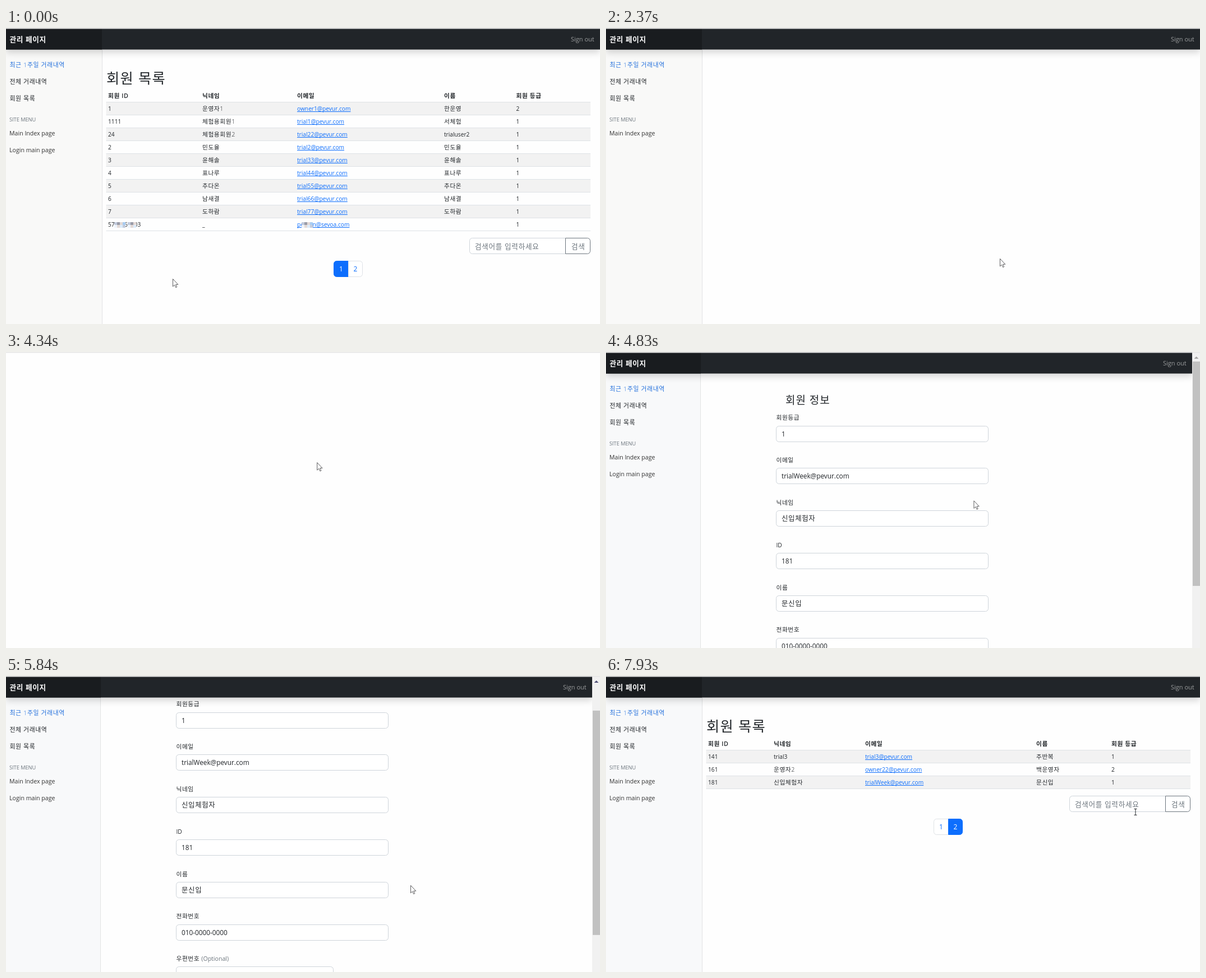
An HTML page with a canvas that plays this animation: 1059 px wide and 529 px high, repeating every 8 s.

```html
<!DOCTYPE html>
<html lang="ko">
<head>
<meta charset="utf-8">
<title>관리 페이지</title>
<style>
  html, body { margin: 0; width: 100%; height: 100%; overflow: hidden; background: #fff; }
  canvas { display: block; }
</style>
</head>
<body>
<canvas id="stage" width="1059" height="529"></canvas>
<script>
const c = document.getElementById('stage').getContext('2d');
const W = 1059, H = 529, LOOP = 8000;
const INK = '#212529', BLUE = '#0d6efd', DEEP = '#0a58ca', GREY = '#6c757d', LINE = '#dee2e6', EDGE = '#ced4da';

const mail = (user) => user + '@pevur.com';
const PAGE1 = [
  ['1', '운영자1', mail('owner1'), '한운영', '2'],
  ['1111', '체험용회원1', mail('trial1'), '서체험', '1'],
  ['24', '체험용회원2', mail('trial22'), 'trialuser2', '1'],
  ['2', '민도율', mail('trial2'), '민도율', '1'],
  ['3', '윤해솔', mail('trial33'), '윤해솔', '1'],
  ['4', '표나루', mail('trial44'), '표나루', '1'],
  ['5', '추다온', mail('trial55'), '추다온', '1'],
  ['6', '남새결', mail('trial66'), '남새결', '1'],
  ['7', '도하람', mail('trial77'), '도하람', '1'],
  ['5710462803', '_', 'podhin@sevoa.com', '', '1']
];
const PAGE2 = [
  ['141', 'trial3', mail('trial3'), '주반복', '1'],
  ['161', '운영자2', mail('owner22'), '백운영자', '2'],
  ['181', '신입체험자', mail('trialWeek'), '문신입', '1']
];
const COLS1 = [182, 350, 519, 781, 909.5];
const COLS2 = [182, 299, 462, 767, 901];
const COLS2_HOVER = [182, 296.5, 457, 772, 904];
const HEADS = ['회원 ID', '닉네임', '이메일', '이름', '회원 등급'];

// label, label centre, width, value, optional
const FIELDS = [
  ['회원등급', 117.5, 379, '1'],
  ['이메일', 193.3, 379, mail('trialWeek')],
  ['닉네임', 269.1, 379, '신입체험자'],
  ['ID', 344.9, 379, '181'],
  ['이름', 420.7, 379, '문신입'],
  ['전화번호', 496.5, 379, '010-0000-0000'],
  ['우편번호', 572.3, 281, '00000', true],
  ['주소', 648.1, 574, '가온 별무구 솔내로 5', true],
  ['상세주소', 727.8, 281, '42', true]
];

// pointer: time, x, y
const PATH = [
  [0, 297, 448], [180, 297, 448], [430, 410, 494], [680, 545, 509], [930, 636, 478],
  [1000, 636, 478], [1300, 597, 460], [1580, 629, 437], [1770, 629, 437], [1840, 630, 438],
  [1960, 630, 438], [2120, 658, 475], [2370, 702, 412], [2780, 706, 354], [2850, 704, 352],
  [3340, 540, 183], [3600, 540, 183], [3680, 540, 187], [3930, 540, 187], [4070, 542, 184],
  [4200, 542, 184], [4340, 554, 197], [4950, 680, 282], [5560, 743, 333], [5700, 738, 342],
  [6290, 667, 475], [7200, 667, 475], [7930, 944, 243], [LOOP, 944, 243]
];

const ARROW = new Path2D('M.5 .5V14L3.6 11.2L5.7 15.8L7.7 14.9L5.7 10.4H9.8Z');
const HAND = new Path2D('M-1.5 1.5Q0 -.5 1.5 1.5V7Q3 5.6 4 7.2Q5.6 6.2 6.3 8Q8 7.4 8 9.5V13' +
  'Q8 15 6.5 17.5H-.5Q-1.5 15.5 -4.6 11.5Q-5.5 9.3 -3.4 9.8L-1.5 11.5Z');

function pointerAt(t) {
  const i = Math.max(1, PATH.findIndex(p => p[0] > t));
  const [a, b] = [PATH[i - 1], PATH[i]];
  const k = (t - a[0]) / (b[0] - a[0]);
  return { x: a[1] + (b[1] - a[1]) * k, y: a[2] + (b[2] - a[2]) * k };
}

const inside = (p, x, y, w, h) => p.x >= x && p.x <= x + w && p.y >= y && p.y <= y + h;

function rect(x, y, w, h, color) {
  c.fillStyle = color;
  c.fillRect(x, y, w, h);
}

function box(x, y, w, h, radii, fill, stroke) {
  c.beginPath();
  c.roundRect(x, y, w, h, radii);
  c.fillStyle = fill;
  c.fill();
  c.strokeStyle = stroke;
  c.lineWidth = 1;
  c.stroke();
}

// y is the vertical centre of the line; returns the text width
function text(s, x, y, size, color = INK, weight = 400, underline = false) {
  const hangul = /[가-힣]/.test(s);
  const px = hangul ? size * 1.05 : size;
  if (hangul && weight === 400) weight = 350;
  c.font = `${weight} ${px}px "Open Sans", "Noto Sans CJK KR", "Noto Sans CJK", sans-serif`;
  c.letterSpacing = hangul ? px * .055 + 'px' : '0px';
  c.fillStyle = color;
  c.fillText(s, x, y + px * .36);
  const w = c.measureText(s).width;
  if (underline) c.fillRect(x, Math.round(y + px * .36 + 1), w, 1);
  return w;
}

function sidebar(edge, t, partial) {
  rect(0, 38, edge, H - 38, t < 4210 ? '#f9f9f8' : '#f8f9fa');
  rect(edge, 38, 1, H - 38, '#e2e3e4');
  text('최근 1주일 거래내역', 6.5, 66, 10.35, '#2470dc');
  text('전체 거래내역', 6.5, 96, 10.35);
  text('회원 목록', 6.5, 126, 10.35);
  text('SITE MENU', 6, 164, 9.2, GREY);
  text('Main Index page', 6, 188.5, 10.6, '#333');
  if (!partial) text('Login main page', 6, 218.5, 10.6, '#333');
}

function topbar(edge, right) {
  c.save();
  c.shadowColor = 'rgba(0,0,0,.15)';
  c.shadowBlur = 12;
  c.shadowOffsetY = 6;
  rect(0, 1, right, 37.5, INK);
  c.restore();
  rect(0, 1, edge, 37.5, '#191c1f');
  text('관리 페이지', 6.5, 20, 12, '#fff', 600);
  text('Sign out', right - 52, 20.5, 11, '#9b9d9e');
}

function mosaic(x, y, cols) {
  const tones = ['#c3cbdc', '#a9cdf2', '#dcebfa', '#e3d9d6', '#9a9ca8', '#eef4fc'];
  for (let i = 0; i < cols * 2; i++)
    rect(x + (i >> 1) * 5, y + (i % 2) * 5, 5, 5, tones[(i * 5 + (i >> 2)) % 6]);
}

function pager(y, active, hover, focus) {
  for (const n of [1, 2]) {
    const on = n === active, lit = n === 2 && (hover || focus);
    const x = n === 1 ? 584.5 : 610.5, w = n === 1 ? 26 : 25;
    const radii = n === 1 ? [5, 0, 0, 5] : [0, 5, 5, 0];
    if (n === 2 && focus) {
      c.beginPath();
      c.roundRect(x - 1.5, y - 1.5, w + 3, 31, radii);
      c.strokeStyle = '#c2dbfe';
      c.lineWidth = 3;
      c.stroke();
    }
    box(x, y, w, 28, radii, on ? BLUE : lit ? '#e9ecef' : '#fff', on ? BLUE : LINE);
    text(String(n), x + w / 2 - 3.4, y + 14.5, 12, on ? '#fff' : lit ? DEEP : BLUE);
  }
}

function list(rows, cols, active, state) {
  text('회원 목록', 179, 90, 24, INK, 300);
  HEADS.forEach((s, i) => text(s, cols[i], 121.5, 10.2, INK, 600));
  rect(178.5, 132, 863.5, 1, LINE);
  rows.forEach((row, r) => {
    const y = 144.5 + r * 23;
    if (r % 2 === 0) rect(178.5, y - 11.5, 863.5, 22, '#f2f2f2');
    rect(178.5, y + 10.5, 863.5, 1, LINE);
    row.forEach((s, i) => {
      const hot = state.link && r === 2;
      if (i === 2) text(s, cols[i], y, 10.2, hot ? DEEP : BLUE, hot ? 600 : 400, true);
      else text(s, cols[i], y, 10.2);
    });
  });
  if (active === 1) {
    mosaic(193, 347, 4);
    mosaic(217, 347, 3);
    mosaic(527, 347, 4);
  }
  const y = 145.5 + rows.length * 23 - (active === 1 ? .5 : 0);
  const top = Math.floor(y) + .5;
  box(826.5, top, 171, 28, [5, 0, 0, 5], '#fff', EDGE);
  text('검색어를 입력하세요', 836, top + 14.5, 12, GREY);
  box(997.5, top, 44, 28, [0, 5, 5, 0], '#fff', GREY);
  text('검색', 1008, top + 14.5, 12, GREY);
  pager(top + 41, active, state.page, state.focus);
}

function form(scroll) {
  c.save();
  c.translate(0, -scroll);
  text('회원 정보', 320, 86, 18);
  for (const [label, y, w, value, optional] of FIELDS) {
    const lw = text(label, 303.5, y, 10.2);
    if (optional) text('(Optional)', 303.5 + lw + 3, y, 10.6, GREY);
    const top = Math.round(y + 14) + .5;
    box(303.5, top, w - 1, 28, 5, '#fff', EDGE);
    text(value, 313, top + 14.5, 11.8);
  }
  c.restore();
}

function scrollbar(scroll) {
  rect(1045, 1, 14, H, '#f1f1f1');
  rect(1046, 17 + scroll * .669, 13, 401, '#c1c1c1');
  c.beginPath();
  c.moveTo(1048.5, 12);
  c.lineTo(1052.5, 8);
  c.lineTo(1056.5, 12);
  c.fillStyle = scroll > 0 ? '#505078' : '#a3a3a3';
  c.fill();
}

function pointer(p, kind) {
  if (kind === 'beam') {
    rect(p.x - .5, p.y - 6, 1, 12, INK);
    rect(p.x - 2.5, p.y - 6, 5, 1, INK);
    rect(p.x - 2.5, p.y + 5, 5, 1, INK);
    return;
  }
  const shape = kind === 'hand' ? HAND : ARROW;
  c.save();
  c.translate(p.x, p.y);
  c.fillStyle = '#fff';
  c.strokeStyle = '#4a4a4c';
  c.lineWidth = .9;
  c.fill(shape);
  c.stroke(shape);
  c.restore();
}

function draw(t) {
  const p = pointerAt(t);
  const first = t < 2300, loading = t >= 2300 && t < 2440;
  const empty = t >= 4210 && t < 4490, onForm = t >= 4490 && t < 7240;
  const second = (t >= 2440 && t < 4210) || t >= 7240;
  let kind = 'arrow';

  rect(0, 0, W, H, '#fefefe');
  if (onForm) {
    const k = Math.min(1, Math.max(0, (t - 5650) / 560));
    const scroll = Math.round(248 * k * k * (3 - 2 * k));
    form(scroll);
    sidebar(168, t);
    topbar(169, 1045);
    scrollbar(scroll);
  } else if (!empty) {
    sidebar(171, t, loading);
    if (first) {
      const page = inside(p, 610, 416, 26, 30);
      list(PAGE1, COLS1, 1, { page, focus: t >= 1600 });
      if (page) kind = 'hand';
    }
    if (second) {
      const link = inside(p, 457, 182, 111, 17);
      list(PAGE2, link ? COLS2_HOVER : COLS2, 2, { link });
      if (link) kind = 'hand';
      else if (inside(p, 826, 214, 172, 30)) kind = 'beam';
    }
    topbar(171, W);
  }
  rect(0, 0, W, 1.5, '#e6e6e6');
  pointer(p, kind);
}

function tick() {
  draw(performance.now() % LOOP);
  requestAnimationFrame(tick);
}
tick();
</script>
</body>
</html>
```
